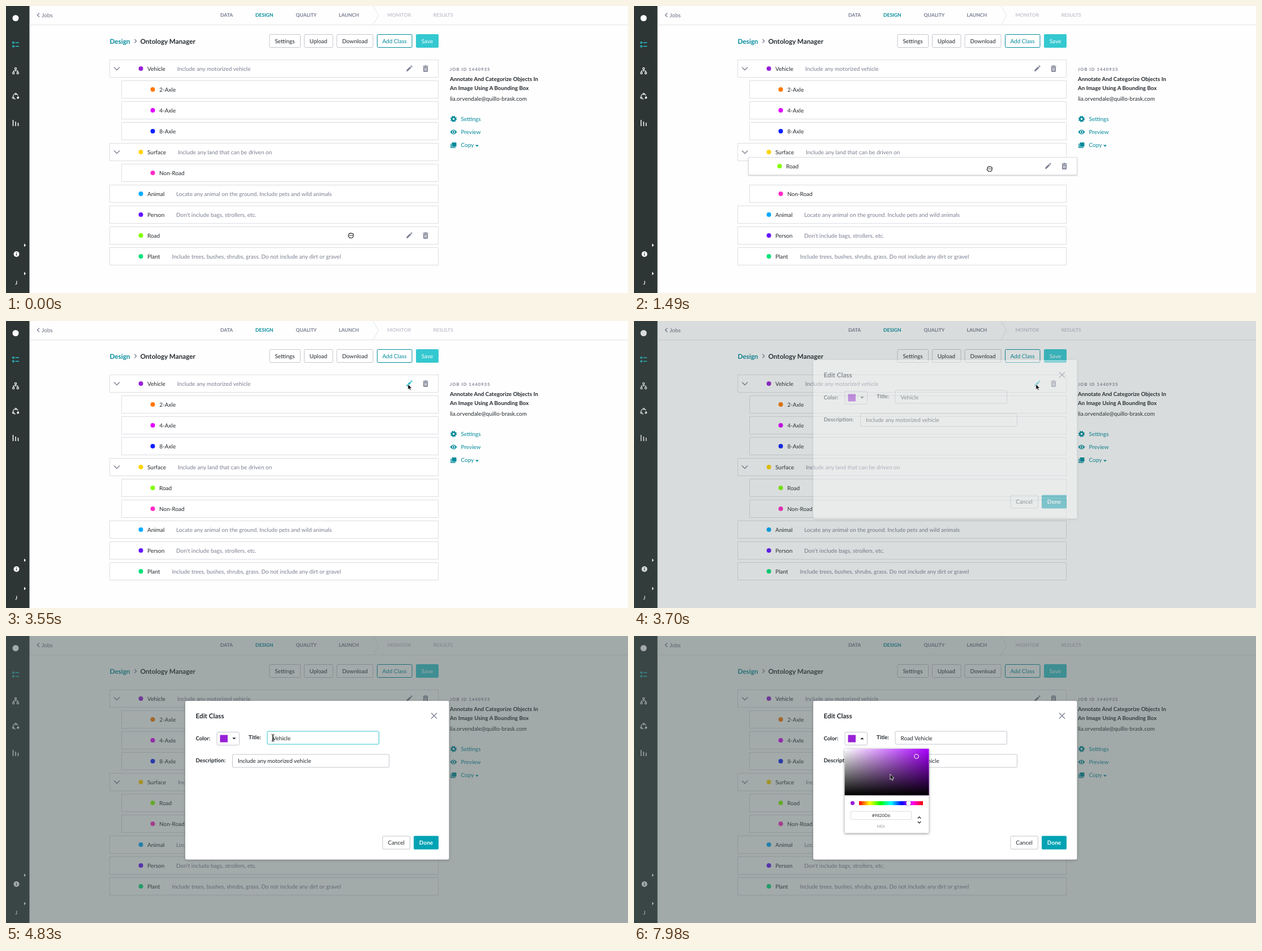
These frames come from a looping animation (1100x509 px, 8 s). An HTML page:

```html
<!DOCTYPE html>
<html lang="en">
<head>
<meta charset="utf-8">
<title>Ontology Manager</title>
<style>
html, body { margin: 0; width: 100%; height: 100%; overflow: hidden; background: #fefefe; }
svg { display: block; width: 1100px; height: 509px; font: 10px Lato, sans-serif; fill: #23282d; text-rendering: geometricPrecision; }
text { white-space: pre; }
.b { font-weight: 700; }
.mid { text-anchor: middle; }
.nav { font-size: 8.6px; font-weight: 700; fill: #777b90; }
.nav .off { fill: #c3c5d0; }
.head { font-size: 11.7px; font-weight: 700; }
.label { font-size: 9.7px; font-weight: 700; }
.teal { fill: #008a9b; }
.desc { fill: #7b7f92; }
.line { fill: none; stroke: #7b7f92; stroke-width: 1.3; }
.box { fill: #fff; stroke: #dcdee2; }
.btn { fill: #fff; stroke: #c3c6ce; }
.white { fill: #fff; }
.icon { fill: #7b7f92; }

/* one shared 8 s clock; every part holds its pose between steps */
.a { animation: 8s step-end infinite; }

.drag { animation-name: drag; }
@keyframes drag {
  0% { transform: none; }
  1.875% { transform: none; animation-timing-function: steps(8, start); }
  18.625% { transform: translate(19px, -123px); }
  20.5% { transform: translate(20px, -117px); }
  22.4% { transform: translate(21px, -113px); }
  24.4%, 100% { transform: translate(21px, -111px); }
}
.drag-box { animation-name: drag-box; }
@keyframes drag-box {
  0% { width: 581px; }
  1.875% { width: 581px; filter: drop-shadow(0 1px 1px #0003); }
  24.4%, 100% { width: 560px; filter: none; }
}
.drag-icons { animation-name: drag-icons; }
@keyframes drag-icons {
  0% { transform: none; opacity: 1; }
  24.4% { transform: translateX(-21px); opacity: 1; }
  29.625%, 100% { transform: translateX(-21px); opacity: 0; }
}
.shift1 { animation-name: shift1; }
.shift2 { animation-name: shift2; }
.shift3 { animation-name: shift3; }
@keyframes shift1 {
  0% { transform: none; }
  6.06% { transform: none; animation-timing-function: steps(2, start); }
  10.2%, 100% { transform: translateY(37px); }
}
@keyframes shift2 {
  0% { transform: none; }
  10.25% { transform: none; animation-timing-function: steps(2, start); }
  14.4%, 100% { transform: translateY(37px); }
}
@keyframes shift3 {
  0% { transform: none; }
  14.43% { transform: none; animation-timing-function: steps(2, start); }
  18.6%, 100% { transform: translateY(37px); }
}
.hover { animation-name: hover; }
@keyframes hover {
  0% { opacity: 0; }
  29.625% { opacity: 1; transform: translateY(259px); }
  31.45% { opacity: 1; transform: translateY(222px); }
  33.275% { opacity: 1; transform: translateY(185px); }
  36.925% { opacity: 1; transform: translateY(148px); }
  38.75%, 100% { opacity: 0; }
}
.pencil { animation-name: pencil; }
@keyframes pencil {
  0% { fill: #7b7f92; }
  38.75% { fill: #2bbfca; }
  50.75%, 100% { fill: #7b7f92; }
}

.shade { animation-name: shade; }
@keyframes shade {
  0% { opacity: 0; }
  46.25% { opacity: .4; }
  48.5%, 100% { opacity: 1; }
}
.modal { animation-name: modal; }
@keyframes modal {
  0% { opacity: 0; }
  46.25% { opacity: .42; transform: translateY(-46px); }
  48.5% { opacity: 1; transform: translateY(-3px); }
  50.75%, 100% { opacity: 1; transform: none; }
}
.field { animation-name: focus; }
@keyframes focus {
  0% { stroke: #c3c6ce; }
  58.5% { stroke: #35c3cc; }
  90.375%, 100% { stroke: #c3c6ce; }
}
.key1 { animation-name: key1; }
.key2 { animation-name: key2; }
.key3 { animation-name: key3; }
.key4 { animation-name: key4; }
.key5 { animation-name: key5; }
@keyframes key1 { 0% { font-size: 0; } 71.625%, 100% { font-size: 10px; } }
@keyframes key2 { 0% { font-size: 0; } 73.5%, 100% { font-size: 10px; } }
@keyframes key3 { 0% { font-size: 0; } 75.375%, 100% { font-size: 10px; } }
@keyframes key4 { 0% { font-size: 0; } 77.25%, 100% { font-size: 10px; } }
@keyframes key5 { 0% { font-size: 0; } 81%, 100% { font-size: 10px; } }
.caret { animation-name: caret; }
@keyframes caret {
  0% { opacity: 0; }
  58.5% { opacity: 1; transform: none; }
  67.875% { opacity: 0; }
  71.625% { opacity: 1; transform: translateX(6px); }
  73.5% { opacity: 1; transform: translateX(11.5px); }
  75.375% { opacity: 1; transform: translateX(16.5px); }
  77.25% { opacity: 1; transform: translateX(22px); }
  81% { opacity: 1; transform: translateX(24px); }
  84.75%, 100% { opacity: 0; }
}
.closed { animation-name: closed; }
.opened { animation-name: opened; }
@keyframes closed { 0% { opacity: 1; } 90.375%, 100% { opacity: 0; } }
@keyframes opened { 0% { opacity: 0; } 90.375%, 100% { opacity: 1; } }

.cursor { animation-name: cursor; }
@keyframes cursor {
  0% { transform: translate(610px, 407px); }
  1.875% { transform: translate(610px, 407px); animation-timing-function: steps(8, start); }
  18.625% { transform: translate(629px, 289px); }
  29.625% { transform: translate(629px, 289px); animation-timing-function: steps(6, start); }
  40.575% { transform: translate(710.8px, 112px); }
  50.75% { transform: translate(710.8px, 112px); animation-timing-function: steps(4, start); }
  58.59% { transform: translate(472px, 180.5px); }
  84.75% { transform: translate(472px, 180.5px); animation-timing-function: steps(3, start); }
  90.375% { transform: translate(403px, 177px); }
  97.875% { transform: translate(428px, 211px); }
  99.75%, 100% { transform: translate(453px, 245px); }
}
.hand { animation-name: hand; }
.arrow { animation-name: arrow; }
.beam { animation-name: beam; }
@keyframes hand { 0% { opacity: 1; } 36.925%, 100% { opacity: 0; } }
@keyframes arrow { 0% { opacity: 0; } 36.925% { opacity: 1; } 56.625% { opacity: 0; } 84.75%, 100% { opacity: 1; } }
@keyframes beam { 0% { opacity: 0; } 56.625% { opacity: 1; } 84.75%, 100% { opacity: 0; } }
</style>
</head>
<body>
<svg viewBox="0 0 1100 509">
<defs>
  <path id="pen" d="M-5 5l.6-2.7 5.9-5.9 2.1 2.1-5.9 5.9zM2.3-4.4l1-1q.6-.4 1.1.1l.9.9q.5.5.1 1.1l-1 1z"/>
  <path id="bin" d="M-4.7-4.8h2.9l.6-1h2.4l.6 1h2.9v1.4h-9.4zM-4-2.8h8v7.2q0 1.4-1.4 1.4h-5.2q-1.4 0-1.4-1.4zM-2.2-1.3v5.4h.9v-5.4zM-.45-1.3v5.4h.9v-5.4zM1.3-1.3v5.4h.9v-5.4z" fill-rule="evenodd"/>
  <g id="tools" class="icon"><use href="#pen" x="713"/><use href="#bin" x="742"/></g>
  <path id="fold" class="line" d="M7-2.5l5 5 5-5"/>
  <rect id="row" class="box" x="-.5" y="-15.5" width="581" height="31"/>
  <rect id="sub" class="box" x="-.5" y="-15.5" width="560" height="31"/>
  <linearGradient id="sat"><stop stop-color="#fff"/><stop offset="1" stop-color="#a800ff"/></linearGradient>
  <linearGradient id="dark" x2="0" y2="1"><stop stop-opacity="0"/><stop offset="1"/></linearGradient>
  <linearGradient id="hue">
    <stop stop-color="red"/><stop offset=".167" stop-color="#ff0"/><stop offset=".333" stop-color="#0f0"/>
    <stop offset=".5" stop-color="#0ff"/><stop offset=".667" stop-color="#00f"/><stop offset=".833" stop-color="#f0f"/>
    <stop offset="1" stop-color="red"/>
  </linearGradient>
</defs>

<rect width="1100" height="509" fill="#fefefe"/>

<!-- sidebar -->
<rect width="41.5" height="509" fill="#2d3635"/>
<circle class="white" cx="17" cy="21.5" r="5.5"/>
<g fill="none" stroke="#2bbfca" stroke-width="1.4">
  <circle cx="13" cy="65" r="1.4"/><circle cx="13" cy="71.5" r="1.4"/>
  <path d="M16.5 65h6.5M16.5 71.5h6.5"/>
</g>
<g fill="none" stroke="#fff" stroke-width="1.2">
  <circle cx="17" cy="111" r="1.6"/><circle cx="13.2" cy="119" r="1.6"/><circle cx="20.8" cy="119" r="1.6"/>
  <path d="M17 112.8v2.2M13.2 117.4V115h7.6v2.4"/>
  <circle cx="17" cy="160.5" r="4.6" stroke-dasharray="4.4 2.8"/>
  <circle cx="17" cy="155.8" r="1.3"/><circle cx="12.7" cy="162.5" r="1.3"/><circle cx="21.3" cy="162.5" r="1.3"/>
  <path d="M12.5 202v11M17 205v8M21.5 207v6" stroke-width="1.5"/>
</g>
<circle class="white" cx="18.5" cy="440" r="5"/>
<path d="M18.5 439.2v3.3M18.5 437v1.3" stroke="#2d3635" stroke-width="1.4"/>
<path class="white" d="M32 421.3l3.2 3-3.2 3zM32 471.5l3.2 3-3.2 3z"/>
<text class="white b mid" x="18.3" y="493.5" font-size="9">J</text>

<!-- top bar -->
<path d="M41.5 33.5H1100M649 0l10 16.5-10 17" fill="none" stroke="#e1e3e8"/>
<path class="line" d="M59 12.5L55.3 16l3.7 3.5"/>
<text x="63" y="19.7" fill="#6a6f82">Jobs</text>
<g class="nav">
  <text x="379" y="19">DATA</text>
  <text class="teal" x="441" y="19">DESIGN</text>
  <text x="512.5" y="19">QUALITY</text>
  <text x="588.5" y="19">LAUNCH</text>
  <text class="off" x="674.5" y="19">MONITOR</text>
  <text class="off" x="755.5" y="19">RESULTS</text>
</g>

<!-- heading and buttons -->
<g class="head"><text class="teal" x="183.5" y="66.5">Design</text><text x="237.5" y="66.5">Ontology Manager</text></g>
<path class="line" d="M227.3 59l3.3 3.2-3.3 3.3"/>
<g class="btn">
  <rect x="466" y="50.5" width="54.5" height="23" rx="2"/>
  <rect x="527.5" y="50.5" width="50.5" height="23" rx="2"/>
  <rect x="585" y="50.5" width="64" height="23" rx="2"/>
  <rect x="656.5" y="50.5" width="61.5" height="23" rx="2" stroke="#008a9b"/>
</g>
<rect x="725" y="50" width="40" height="24" rx="2" fill="#34c8d0"/>
<g class="mid">
  <text x="493" y="66">Settings</text><text x="552.5" y="66">Upload</text><text x="617" y="66">Download</text>
  <text class="teal" x="687" y="66">Add Class</text><text class="white" x="745" y="66">Save</text>
</g>

<!-- job panel -->
<text class="b desc" x="785" y="114.5" font-size="7.5" letter-spacing="1.1">JOB ID 1440935</text>
<g class="b" font-size="9.75"><text x="785" y="132.8">Annotate And Categorize Objects In</text><text x="785" y="148.8">An Image Using A Bounding Box</text></g>
<text x="785" y="167.7">lia.orvendale@quillo-brask.com</text>
<g class="teal">
  <text x="804.5" y="203.7">Settings</text><text x="804.5" y="227">Preview</text><text x="804.5" y="250">Copy</text>
  <path d="M830 246.5h6l-3 3.2zM785.5 223.5q6-8 12 0q-6 8-12 0z"/>
  <rect x="788.5" y="242" width="8" height="7.5" rx=".8"/>
  <path d="M786.3 244.3h1.4v6h7v1.5h-8.4z"/>
</g>
<g fill="none" stroke="#008a9b"><circle cx="791.5" cy="200.3" r="3.1" stroke-width="2.6"/><circle cx="791.5" cy="200.3" r="4.6" stroke-width="2" stroke-dasharray="1.9 1.71"/></g>
<circle cx="791.5" cy="223.5" r="2.2" fill="#008a9b" stroke="#fff" stroke-width="1.1"/>

<!-- class list -->
<g transform="translate(184 111)">
  <use href="#row"/><use href="#fold"/><circle cx="54.5" r="4" fill="#9820d6"/>
  <text x="66" y="3.8">Vehicle</text><text class="desc" x="118.7" y="3.8">Include any motorized vehicle</text>
  <use class="a pencil" href="#pen" x="529"/><use class="icon" href="#bin" x="558"/>
</g>
<g transform="translate(205 148)"><use href="#sub"/><circle cx="54.5" r="4" fill="#ff7800"/><text x="66.3" y="3.8">2-Axle</text></g>
<g transform="translate(205 185)"><use href="#sub"/><circle cx="54.5" r="4" fill="#e000ff"/><text x="66.3" y="3.8">4-Axle</text></g>
<g transform="translate(205 222)"><use href="#sub"/><circle cx="54.5" r="4" fill="#0a1eff"/><text x="66.3" y="3.8">8-Axle</text></g>
<g transform="translate(184 259)">
  <use href="#row"/><use href="#fold"/><circle cx="54.5" r="4" fill="#ffd400"/>
  <text x="66" y="3.8">Surface</text><text class="desc" x="120" y="3.8">Include any land that can be driven on</text>
</g>
<g class="a shift3"><g transform="translate(205 296)"><use href="#sub"/><circle cx="54.5" r="4" fill="#ff28c8"/><text x="66" y="3.8">Non-Road</text></g></g>
<g class="a shift2"><g transform="translate(184 333)">
  <use href="#row"/><circle cx="54.5" r="4" fill="#00aaff"/>
  <text x="66" y="3.8">Animal</text><text class="desc" x="117" y="3.8">Locate any animal on the ground. Include pets and wild animals</text>
</g></g>
<g class="a shift1"><g transform="translate(184 370)">
  <use href="#row"/><circle cx="54.5" r="4" fill="#6414ff"/>
  <text x="66" y="3.8">Person</text><text class="desc" x="117" y="3.8">Don't include bags, strollers, etc.</text>
</g></g>
<g transform="translate(184 444)">
  <use href="#row"/><circle cx="54.5" r="4" fill="#00e27a"/>
  <text x="66" y="3.8">Plant</text><text class="desc" x="109.5" y="3.8">Include trees, bushes, shrubs, grass. Do not include any dirt or gravel</text>
</g>
<use class="a hover" href="#tools"/>
<g class="a drag"><g transform="translate(184 407)">
  <rect class="box a drag-box" x="-.5" y="-15.5" width="581" height="31"/>
  <circle cx="54.5" r="4" fill="#82ff00"/><text x="66" y="3.8">Road</text>
  <g class="a drag-icons"><use href="#tools" x="-184"/></g>
</g></g>

<!-- edit dialog -->
<rect class="a shade" width="1100" height="509" fill="#485656" fill-opacity=".5"/>
<g class="a modal">
  <rect class="white" x="317" y="115" width="466.5" height="281.5" rx="3" style="filter: drop-shadow(0 1px 2px #0004)"/>
  <text class="head" x="335.5" y="145.8">Edit Class</text>
  <path class="line" d="M752 136.5l10 10M762 136.5l-10 10"/>
  <g class="label"><text x="335.5" y="184.7">Color:</text><text x="429" y="183.3">Title:</text><text x="335.5" y="224.2">Description:</text></g>
  <g class="btn">
    <rect x="373" y="170.5" width="39.5" height="23" rx="2"/>
    <rect class="a field" x="462" y="169" width="197.5" height="23" rx="2"/>
    <rect x="400.5" y="210" width="277" height="23" rx="2"/>
    <rect x="666" y="355" width="48.5" height="23" rx="2"/>
  </g>
  <rect x="378.5" y="175.5" width="13.5" height="13" fill="#9820d6"/>
  <path class="a closed" d="M400.3 180.3h6.2l-3.1 3.3z"/>
  <path class="a opened" d="M400.3 183.3h6.2l-3.1-3.3z"/>
  <text x="471.5" y="184.6"><tspan class="a key1">R</tspan><tspan class="a key2">o</tspan><tspan class="a key3">a</tspan><tspan class="a key4">d</tspan><tspan class="a key5"> </tspan><tspan>Vehicle</tspan></text>
  <rect class="a caret" x="471.5" y="175" width="1" height="12.5"/>
  <text x="410" y="225.4">Include any motorized vehicle</text>
  <rect x="721" y="354.5" width="44" height="24" rx="2" fill="#00a3b4"/>
  <text class="mid" x="690" y="370">Cancel</text>
  <text class="mid white b" x="743" y="370">Done</text>

  <!-- colour picker -->
  <g class="a opened">
    <rect class="white" x="372.5" y="200" width="149" height="149.5" rx="1.5" style="filter: drop-shadow(0 1px 2px #0007)"/>
    <rect x="372.5" y="200" width="149" height="82.5" fill="url(#sat)"/>
    <rect x="372.5" y="200" width="149" height="82.5" fill="url(#dark)"/>
    <circle cx="499.5" cy="213.5" r="3.8" fill="none" stroke="#fff" stroke-width="1.1"/>
    <circle cx="386.5" cy="296.3" r="3.6" fill="#9820d6"/>
    <rect x="398" y="293" width="113" height="7" fill="url(#hue)"/>
    <circle cx="485.5" cy="296.5" r="4.2" fill="#f8f8f8" style="filter: drop-shadow(0 .5px 1px #0006)"/>
    <rect class="box" x="383.5" y="311" width="107" height="14.5" rx="1"/>
    <text class="mid" x="437" y="321.2" font-size="7.6">#9820D6</text>
    <text class="mid" x="436.5" y="339.7" font-size="7" fill="#969696">HEX</text>
    <path d="M501.8 323.5l2.8-2.8 2.8 2.8M501.8 329l2.8 2.8 2.8-2.8" fill="none" stroke="#333" stroke-width="1.3"/>
  </g>
</g>

<!-- pointer -->
<g class="a cursor">
  <path class="a hand" d="M-3.6-2.6q.7-1.7 2-.9q1-1.2 2.1-.2q1.3-.7 2 .4q1.7-.2 1.7 1.5v2.2q0 2.6-2 3.9h-4.4q-1-1.9-2.3-2.9q-.8-1.4.7-1.7zM-1.4-1v1.4M.6-1v1.4M2.5-.8v1.2" fill="#fff" stroke="#111" stroke-width="1.1" stroke-linejoin="round"/>
  <path class="a arrow" d="M0 0v9.7l2.2-2 1.5 3.4 1.7-.7-1.5-3.4h3z" fill="#000" stroke="#fff" stroke-width=".8"/>
  <path class="a beam" d="M-2.6-6q2 0 2.6 1.2q.6-1.2 2.6-1.2M0-4.8v9.6M-2.6 6q2 0 2.6-1.2q.6 1.2 2.6 1.2M-1.3 2.5h2.6" fill="none" stroke="#111"/>
</g>
</svg>
</body>
</html>
```
